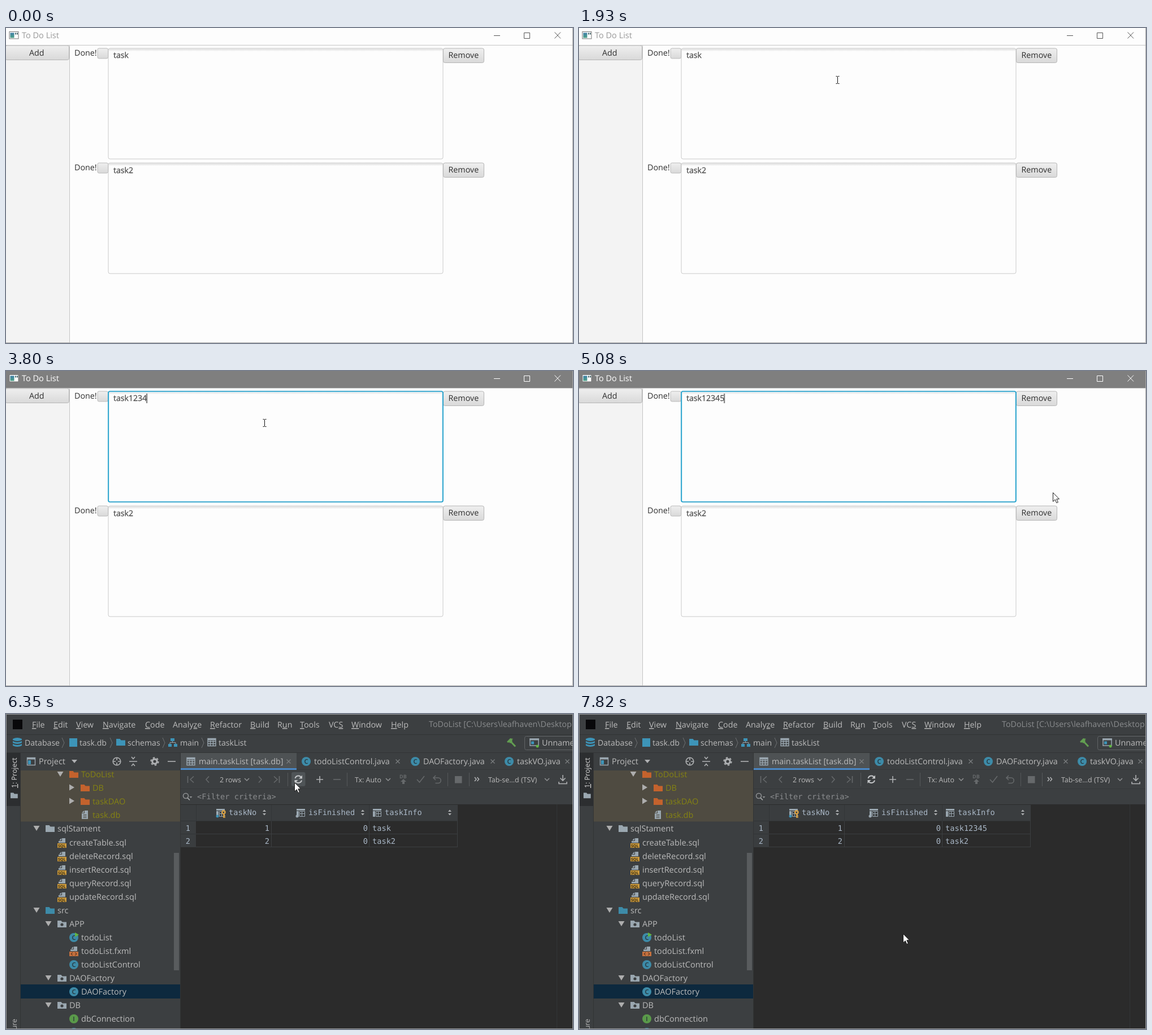
Write an HTML page that moves like this. It is 1003x558 px and loops after 8 s.

```html
<!DOCTYPE html>
<html lang="en">
<head>
<meta charset="utf-8">
<title>To Do List</title>
<style>
html, body { margin: 0; width: 100%; height: 100%; overflow: hidden; background: #fdfdfd; }
svg { display: block; }
text { font: 14.3px "Open Sans", "Noto Sans", sans-serif; fill: #2e2e2e; text-rendering: geometricPrecision; white-space: pre; }
#todo .note { font-size: 14.1px; fill: #484848; stroke: #484848; stroke-width: .25; }
#todo .title { font-size: 14.5px; fill: currentColor; }
#ide text { fill: #bbb; }
#ide .tree { font-size: 14.5px; }
#ide .crumb { font-size: 14.1px; }
#ide .small { font-size: 12.4px; }
#ide .mono { font: 13.65px "DejaVu Sans Mono", monospace; fill: #a9b7c6; }
#ide .dim { fill: #8a8c8e; }
#ide .lit { fill: #dcdcdc; }
#ide .olive { fill: #858312; }
.tag { font-size: 7px; font-weight: 700; fill: #3a2e14; }
.letter { font-size: 11px; font-weight: 600; fill: #263238; text-anchor: middle; }
.line { fill: none; stroke: #afb1b3; stroke-width: 1.6; }
.off { fill: none; stroke: #66696b; stroke-width: 1.6; }
.end { text-anchor: end; }

#mouse, #arrow, #beam, #on, #caret, #type, #ide, #tabOn, #hover, #press, #busy, #fresh {
  animation: 8s step-end infinite;
}
#mouse { animation-name: move; }
#arrow { animation-name: arrow; }
#beam { animation-name: beam; }
#on { animation-name: on; }
#caret { animation-name: caret; }
#type { animation-name: type; }
#ide { animation-name: ide; }
#tabOn { animation-name: tab; }
#hover { animation-name: hover; }
#press { animation-name: press; }
#busy { animation-name: busy; }
#fresh { animation-name: fresh; }

@keyframes move {
  0% { transform: translate(-50px, -50px); }
  14% { transform: translate(833px, 522px); }
  15.5% { transform: translate(610px, 473px); }
  17.375% { transform: translate(476px, 302px); }
  18.875% { transform: translate(462px, 197px); }
  20.375% { transform: translate(459px, 132px); }
  22.25% { transform: translate(457px, 99px); }
  24.125% { transform: translate(457px, 92px); }
  55.625% { transform: translate(500px, 96px); }
  57.125% { transform: translate(590px, 120px); }
  58.625% { transform: translate(705px, 165px); }
  60.125% { transform: translate(863px, 228px); }
  61.625% { transform: translate(838px, 210px); }
  63.5% { transform: translate(838px, 215px); }
  70.75% { transform: translate(905px, 250px); }
  72.25% { transform: translate(971px, 280px); }
  74.125% { transform: translate(740px, 238px); }
  75.625% { transform: translate(430px, 169px); }
  77.5% { transform: translate(439px, 134px); }
  79.375% { transform: translate(510px, 121px); }
  80.875% { transform: translate(523px, 120px); }
  82.375% { transform: translate(517px, 115px); }
  87.625% { transform: translate(585px, 346px); }
  89.125% { transform: translate(572px, 335px); }
  92.875% { transform: translate(554px, 270px); }
  94.75% { transform: translate(560px, 320px); }
  96.25% { transform: translate(569px, 368px); }
  97.75%, 100% { transform: translate(573px, 389px); }
}
@keyframes arrow { 0% { opacity: 1; } 17.375% { opacity: 0; } 60.125%, 100% { opacity: 1; } }
@keyframes beam { 0% { opacity: 0; } 17.375% { opacity: 1; } 60.125%, 100% { opacity: 0; } }
@keyframes on { 0% { opacity: 0; } 25.625%, 100% { opacity: 1; } }
@keyframes caret {
  0% { opacity: 0; } 27.125% { opacity: 1; } 33.75% { opacity: 0; }
  39.125% { opacity: 1; } 57.125% { opacity: 0; } 63.5%, 100% { opacity: 1; }
}
@keyframes type {
  0% { transform: none; }
  41% { transform: translateX(8.07px); }
  42.5% { transform: translateX(16.14px); }
  44% { transform: translateX(24.2px); }
  47.5% { transform: translateX(32.3px); }
  50.625%, 100% { transform: translateX(40.3px); }
}
@keyframes ide { 0% { opacity: 0; } 68.875%, 100% { opacity: 1; } }
@keyframes tab { 0% { fill: #747a80; } 72.25%, 100% { fill: #4a88c7; } }
@keyframes hover { 0% { opacity: 0; } 79.375% { opacity: 1; } 87.625%, 100% { opacity: 0; } }
@keyframes press { 0% { opacity: 0; } 82.375% { opacity: 1; } 84.25%, 100% { opacity: 0; } }
@keyframes busy { 0% { opacity: 0; } 87.625% { opacity: 1; } 92.875%, 100% { opacity: 0; } }
@keyframes fresh { 0% { opacity: 0; } 92.875%, 100% { opacity: 1; } }
</style>
</head>
<body>
<svg width="1003" height="558" viewBox="0 0 1003 558">
<defs>
  <linearGradient id="btn" x2="0" y2="1"><stop stop-color="#efefef"/><stop offset="1" stop-color="#d9d9d9"/></linearGradient>
  <linearGradient id="shade" x2="0" y2="1"><stop stop-color="#dcdcdc"/><stop offset="1" stop-color="#fdfdfd"/></linearGradient>
  <linearGradient id="teal" x2="0" y2="1"><stop stop-color="#3f7fa8"/><stop offset="1" stop-color="#4fa287"/></linearGradient>

  <g id="controls" fill="none" stroke="currentColor">
    <path d="M863 13.5h11M916.5 8.5h10v10h-10zM970.5 7.5l10.5 11M981 7.5l-10.5 11"/>
  </g>
  <g id="task">
    <text x="121" y="49">Done!</text>
    <rect x="162" y="36" width="18.5" height="18" rx="2.5" fill="url(#btn)" stroke="#b9b9b9"/>
    <rect x="181" y="36" width="592" height="196" rx="3" fill="#fdfdfd" stroke="#c9c9c9"/>
    <rect x="182" y="36.5" width="590" height="5" fill="url(#shade)"/>
    <rect x="773.5" y="36" width="72" height="25.5" rx="3" fill="url(#btn)" stroke="#b5b5b5"/>
    <text x="782.5" y="53">Remove</text>
  </g>

  <path id="folder" d="M0 2h6.500l2 2.500H16V14H0z"/>
  <g id="pkg"><use href="#folder" fill="#9aa7b0"/><circle cx="8" cy="9" r="2.600" fill="#3c3f41"/></g>
  <g id="file"><path fill="#9aa7b0" d="M7 0h6v15H2V5h5zM6 0v4H2z"/><path stroke="#4f4b41" d="M4.500 7.500h6M4.500 10h6M4.500 12.500h6"/></g>
  <path id="page" fill="#9aa7b0" d="M8 0h6v8H2V5h6zM7 0v4H3z"/>
  <g id="sql"><use href="#page"/><path fill="#c9983c" d="M0 9h16v8H0z"/><text class="tag" x="1" y="15.500">SQL</text></g>
  <g id="fxml"><use href="#page"/><path fill="#c4703e" d="M0 9h16v8H0z"/><path fill="none" stroke="#3a2418" d="M6 10.500l-3 2.500 3 2.500M10 10.500l3 2.500-3 2.500"/></g>
  <g id="cls"><circle cx="8" cy="8" r="8" fill="#3d8ba8"/><text class="letter" x="8" y="12">C</text></g>
  <g id="app"><use href="#cls"/><path fill="#62b543" d="M10-1l7 4-7 4z"/></g>
  <g id="iface"><circle cx="8" cy="8" r="8" fill="#5a9a4a"/><text class="letter" x="8" y="12">I</text></g>
  <g id="table" fill="none" stroke="#9aa7b0" stroke-width="1.400"><path d="M1 1.500h14v13H1zM1 6.500h14M1 10.500h14M5.500 5v9M10.500 5v9"/><path stroke-width="3" d="M1 3h14"/></g>
  <g id="column"><path fill="#9aa7b0" d="M1 1h15v3H1zM1 5h4v10H1z"/><path fill="none" stroke="#9aa7b0" d="M6.500 5.500h4v4h-4zM10.500 5.500h5v4h-5zM6.500 9.500h4v5h-4zM10.500 9.500h5v5h-5z"/></g>
  <path id="sort" fill="#afb1b3" d="M0-1.500l3-3.500 3 3.500zM0 1.500l3 3.500 3-3.500z"/>
  <path id="down" fill="#adadad" d="M-5.500-4H5.500L0 5z"/>
  <path id="right" fill="#adadad" d="M-4-5.500V5.500L5 0z"/>
  <path id="drop" fill="none" stroke="#8f9193" stroke-width="1.500" d="M-4-2l4 4 4-4"/>
  <path id="crumb" fill="none" stroke="#6f7274" d="M0-9l4 9-4 9"/>
  <path id="close" fill="none" stroke="#7c7f81" stroke-width="1.200" d="M-3.500-3.500l7 7M3.500-3.500l-7 7"/>
</defs>

<g id="todo">
  <rect width="1003" height="558" fill="#fdfdfd"/>
  <rect y="31" width="112" height="527" fill="#f3f3f3"/>
  <g color="#999"><text class="title" x="28" y="18">To Do List</text></g>
  <use href="#controls" color="#555"/>
  <use href="#task"/>
  <use href="#task" y="203"/>
  <rect x="-1" y="31" width="112.500" height="25.500" rx="3" fill="url(#btn)" stroke="#b5b5b5"/>
  <text x="41" y="49">Add</text>
  <path d="M112.500 31V558" stroke="#c3c3c3"/>
  <text class="note" x="190" y="53">task12345</text>
  <text class="note" x="190" y="257">task2</text>
  <g id="type">
    <rect x="217" y="42" width="45" height="14" fill="#fdfdfd"/>
    <path id="caret" d="M216.800 40V57" stroke="#333" stroke-width="1.300"/>
  </g>
  <g id="on" color="#fff">
    <rect width="1003" height="30" fill="#7f7f7f"/>
    <text class="title" x="28" y="18">To Do List</text>
    <use href="#controls"/>
    <rect x="182.500" y="37.500" width="589" height="193" rx="2" fill="none" stroke="#d5eef7"/>
    <rect x="181" y="36" width="592" height="196" rx="3" fill="none" stroke="#1a9fcd" stroke-width="1.700"/>
  </g>
  <rect x="6" y="6.500" width="16" height="12.500" fill="#fff" stroke="#777"/>
  <rect x="7.500" y="8.500" width="7" height="9" fill="url(#teal)"/>
  <path fill="#4b6d72" d="M16 8.500h2v3h-2zM19 8.500h2v3h-2z"/>
  <path d="M0 30.500H1003" stroke="#c6c6c6"/>
  <path d="M0 557.500H1002.500V0" fill="none" stroke="#a6a6a6"/>
</g>

<g id="ide">
  <rect width="1003" height="558" fill="#3c3f41"/>
  <path d="M0 36.500H1003M0 68.500H1003M25.500 69V558M308.500 69V558" stroke="#323435"/>
  <rect x="12" y="10" width="17" height="17" fill="#08080a"/>
  <g id="menu"></g>
  <text class="dim" x="748" y="23">ToDoList [C:\Users\leafhaven\Desktop</text>

  <!-- breadcrumbs -->
  <g fill="#3d94b8"><path d="M12 44q8-4 16 0v2q-8 4-16 0zM12 48q8 4 16 0v3q-8 4-16 0zM12 53q8 4 16 0v3q-8 4-16 0z"/>
    <rect x="112" y="43" width="14" height="15"/><use href="#folder" x="195" y="42"/>
    <path d="M291 43h7v5h-7zM287 53h6v5h-6zM297 53h6v5h-6z"/></g>
  <path fill="none" stroke="#9aa7b0" d="M294.500 48v3M290 53v-2.500h10V53"/>
  <use href="#table" x="356" y="42"/>
  <g id="crumbs"></g>
  <path d="M893 49l8 8.500" stroke="#629e51" stroke-width="3"/><path fill="#629e51" d="M886 49l6-6 5 1-2 2 1 2-4 4-2-2-2 1z"/>
  <rect x="917.500" y="39.500" width="100" height="24" rx="3" fill="none" stroke="#626567"/>
  <path d="M927 44h15v12h-15z" fill="none" stroke="#9aa7b0" stroke-width="1.500"/><path d="M926 45h17" stroke="#9aa7b0" stroke-width="3"/>
  <path fill="#3d94b8" d="M929 48.500h5v5h-5z"/><circle cx="940" cy="57" r="2.500" fill="#62b543"/>
  <text x="948" y="56">Unnamed</text>

  <!-- side stripe -->
  <rect x="1" y="69" width="24" height="94" fill="#2c2e30"/>
  <text class="small lit" transform="translate(19 131) rotate(-90)"><tspan text-decoration="underline">1</tspan>: Project</text>
  <use href="#folder" transform="translate(8 138) scale(.8)" fill="#9aa7b0"/>
  <text class="small end" transform="translate(19 540) rotate(-90)">Structure</text>

  <!-- project tree -->
  <rect x="26" y="100" width="282" height="90.500" fill="#4f4b41"/>
  <rect x="26" y="479" width="282" height="25" fill="#0d293e"/>
  <g id="tree"></g>
  <rect x="297" y="246" width="9" height="208" fill="#595c5e"/>
  <path d="M37.500 77.500h14v13h-14z" fill="none" stroke="#9aa7b0" stroke-width="1.400"/><path d="M37 79h15" stroke="#9aa7b0" stroke-width="3"/><path fill="#3d94b8" d="M39 82h5v7h-5z"/>
  <text class="tree" x="58" y="89">Project</text>
  <path fill="#afb1b3" d="M116 81h10l-5 6z"/>
  <circle class="line" cx="196" cy="84" r="6.800"/><path class="line" d="M196 77v5M196 86v5M189 84h5M198 84h5"/>
  <path class="line" d="M218 84h14M222 76l3 3.500 3-3.500M222 92l3-3.500 3 3.500"/>
  <circle cx="263" cy="84" r="4.200" fill="none" stroke="#afb1b3" stroke-width="3.200"/>
  <circle cx="263" cy="84" r="6.700" fill="none" stroke="#afb1b3" stroke-width="2" stroke-dasharray="3.500 3.516"/>
  <path class="line" d="M286 84h14"/>

  <!-- tabs -->
  <path d="M309 98.500H1003M309 132.500H1003" stroke="#35383a"/>
  <rect x="309" y="69" width="205" height="29" fill="#4e5254"/>
  <rect id="tabOn" x="309" y="96" width="205" height="3"/>
  <use href="#table" x="319" y="76"/>
  <g id="tabs"></g>

  <!-- table toolbar -->
  <path d="M498.500 104v24M603.500 104v24M781.500 104v24M819.500 104v24" stroke="#55585a"/>
  <path class="off" d="M321.500 110v12M332 110.500l-6 5.500 6 5.500M359 110.500l-5 5.500 5 5.500M447 110.500l5 5.500-5 5.500M474 110.500l6 5.500-6 5.500M483.500 110v12"/>
  <rect id="hover" x="505" y="103" width="24.500" height="25" rx="3" fill="#4f5457"/>
  <rect id="press" x="505" y="103" width="24.500" height="25" rx="3" fill="#60666a"/>
  <g fill="none" stroke="#c4c6c8" stroke-width="2"><path d="M511.500 114a6 6 0 0 1 11-1.500M523 117.500a6 6 0 0 1-11 1.500"/><path stroke="none" fill="#c4c6c8" d="M524 108.500v6h-6zM510.500 123v-6h6z"/></g>
  <path class="line" d="M549 116h12M555 110v12" stroke-width="2"/>
  <path class="off" d="M579 116h13"/>
  <text class="small" x="378" y="121">2 rows</text>
  <text class="small" x="617" y="121">Tx: Auto</text>
  <text class="small" x="853" y="121">Tab-se...d (TSV)</text>
  <use href="#drop" x="426" y="116"/><use href="#drop" x="676" y="116"/><use href="#drop" x="957" y="116"/>
  <text x="696" y="114" style="font-size:9px;font-weight:700;fill:#66696b">DB</text><path d="M703 115l5 5h-3v4h-4v-4h-3z" fill="#66696b"/>
  <path class="off" d="M727 116l4.500 5 8.500-11"/>
  <path class="off" d="M760 109l-4 4 4 4M756.500 113h8a4.500 4.500 0 0 1 0 9.500h-5"/>
  <rect x="794" y="110" width="12.500" height="12.500" fill="#66696b"/>
  <rect id="busy" x="794" y="110" width="12.500" height="12.500" fill="#c75450"/>
  <path class="line" d="M829 112l3 3.500-3 3.500M833.500 112l3 3.500-3 3.500"/>
  <path class="line" d="M985 108v9M980.500 113.500l4.500 4.500 4.500-4.500M978 120v3.500h14V120"/>

  <!-- data grid -->
  <circle cx="318" cy="145" r="4.500" fill="none" stroke="#8f9193" stroke-width="1.600"/><path class="line" d="M321 148.500l4 4"/><path fill="#8f9193" d="M324.500 146h5l-2.500 3z"/>
  <text class="mono dim" x="338" y="151">&lt;Filter criteria&gt;</text>
  <rect x="309" y="160" width="694" height="398" fill="#2b2b2b"/>
  <rect x="309" y="161" width="489" height="28" fill="#3a3d3f"/>
  <rect x="309" y="189" width="27" height="47" fill="#3a3d3f"/>
  <path d="M336 212.500H798M336 235.500H798M469.500 189V236M642.500 189V236M798.500 161V236" stroke="#3c3f41" fill="none"/>
  <path d="M309 189.500H798M309 212.500h27M336.500 161v28M469.500 161v28M642.500 161v28M974.500 160V558" stroke="#323537"/>
  <use href="#column" x="371" y="167"/><circle cx="374" cy="181" r="2.500" fill="#3d94b8"/>
  <circle cx="385" cy="174" r="2.700" fill="none" stroke="#e0a23c" stroke-width="2"/><path d="M385 176v8M385 180.500h3M385 183h3" stroke="#e0a23c" stroke-width="1.700"/>
  <use href="#column" x="513" y="167"/><circle cx="515" cy="181" r="2.500" fill="#9aa7b0"/>
  <use href="#column" x="648" y="167"/>
  <g id="grid"></g>
  <text id="fresh" class="mono" x="680.900" y="207">12345</text>
  <path d="M.5 558V.5H1002.500V557.500H0" fill="none" stroke="#999b9c"/>
</g>

<g id="mouse">
  <path id="arrow" d="M.5.500V16.200l3.700-3.500 2.600 5.900 2.600-1.100-2.600-5.700h4.700z" fill="#fff" stroke="#1c1c1c"/>
  <path id="beam" d="M-2.500-6.500h2l1 .7 1-.7h2M-2.500 6.500h2l1-.7 1 .7h2M.5-6V6" fill="none" stroke="#111"/>
</g>
</svg>

<script>
const fill = (id, items, draw) => {
  document.getElementById(id).innerHTML = items.map(draw).join('');
};
const text = (x, y, s, cls = '') => `<text class="${cls}" x="${x}" y="${y}">${s}</text>`;
const icon = (id, x, y, color = '') => `<use href="#${id}" x="${x}" y="${y}" fill="${color}"/>`;

// an underscore marks the shortcut letter
fill('menu', [[46, '_File'], [84, '_Edit'], [124, '_View'], [171, '_Navigate'], [246, '_Code'],
  [295, 'Analy_ze'], [361, '_Refactor'], [432, '_Build'], [480, 'R_un'], [520, '_Tools'],
  [571, 'VC_S'], [611, '_Window'], [681, '_Help']],
  ([x, s]) => text(x, 24, s.replace(/_(.)/, '<tspan text-decoration="underline">$1</tspan>')));

fill('crumbs', [[33, 'Database', 99], [130, 'task.db', 184], [215, 'schemas', 277], [308, 'main', 346], [376, 'taskList']],
  ([x, s, gap]) => text(x, 56, s, 'crumb') + (gap ? icon('crumb', gap, 51) : ''));

fill('tabs', [[341, 'main.taskList [task.db]', 500], [545, 'todoListControl.java', 693],
  [738, 'DAOFactory.java', 861], [904, 'taskVO.java', 993]],
  ([x, s, end], i) => (i ? icon('cls', x - 22, 76) : '') + text(x, 89, s) + icon('close', end, 84));

const orange = '#c4622d', gray = '#9aa7b0', blue = '#3d8ba8';
// label x, label, icon, arrow, folder colour
fill('tree', [
  [133, 'ToDoList', 'folder', 'down', orange],
  [153, 'DB', 'folder', 'right', orange],
  [153, 'taskDAO', 'folder', 'right', orange],
  [153, 'task.db', 'file'],
  [91, 'sqlStament', 'folder', 'down', gray],
  ...['create', 'delete', 'insert', 'query', 'update'].map((s, i) => [112, s + (i ? 'Record' : 'Table') + '.sql', 'sql']),
  [91, 'src', 'folder', 'down', blue],
  [112, 'APP', 'pkg', 'down'],
  [133, 'todoList', 'app'],
  [133, 'todoList.fxml', 'fxml'],
  [133, 'todoListControl', 'cls'],
  [112, 'DAOFactory', 'pkg', 'down'],
  [133, 'DAOFactory', 'cls'],
  [112, 'DB', 'pkg', 'down'],
  [133, 'dbConnection', 'iface'],
  [133, '', 'cls']
], ([x, s, id, arrow, color], i) => {
  const y = Math.round(107.2 + 24.06 * i);
  return (arrow ? icon(arrow, x - 37, y - 1) : '') + icon(id, x - 21, y - 8, color) +
    text(x, y + 5, s, 'tree' + (i < 4 ? ' olive' : ''));
});

fill('grid', [[394, 179, 'taskNo'], [535, 179, 'isFinished'], [670, 179, 'taskInfo'],
  [326, 207, '1', 1], [466, 207, '1', 1], [640, 207, '0', 1], [648, 207, 'task'],
  [326, 230, '2', 1], [466, 230, '2', 1], [640, 230, '0', 1], [648, 230, 'task2']],
  ([x, y, s, end]) => text(x, y, s, end ? 'mono end' : 'mono'));
document.getElementById('grid').innerHTML += [454, 628, 782].map(x => icon('sort', x, 174.5)).join('');
</script>
</body>
</html>
```
